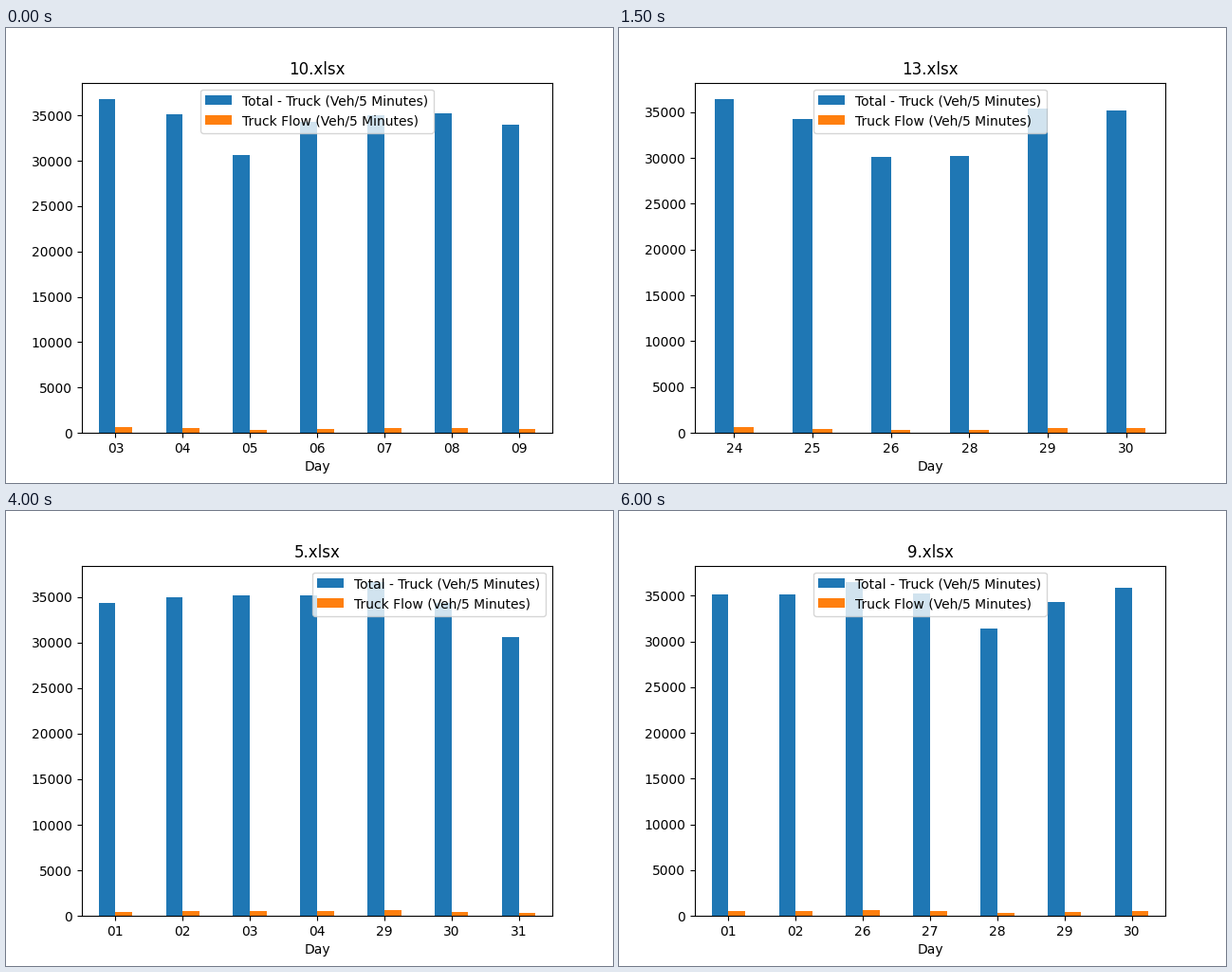
A matplotlib script for the animation above (6500 ms loop, 640 by 480 pixels).

```python
import numpy as np
import matplotlib.pyplot as plt
from matplotlib.animation import FuncAnimation

# Cars on a usual Saturday to Thursday, and on the Friday that opens each week
USUAL = [34300, 30600, 34300, 35000, 35200, 35200]
FRIDAYS = [36130, 36400, 35280, 36300, 36600, 36980, 36500,
           36700, 36480, 36775, 36600, 36400, 36400]

# Cars on unusual days, by week and weekday (Friday is 0)
UNUSUAL = {
    1: {1: 32650, 2: 29480, 5: 34200},
    6: {5: 35650, 6: 35650},
    9: {1: 35250, 2: 31400, 4: 35850},
    10: {1: 35130, 6: 34000},
    12: {1: 33000, 2: 36200, 3: 35650, 5: 34050, 6: 36970},
    13: {2: 30100, 4: 30200, 5: 35400},
}
MISSING = {(13, 3)}
MONTHS = (31, 30, 31)
LEGENDS = {5: "upper right", 12: "upper left"}

# File names in the order they are shown
ORDER = [10, 11, 12, 13] + list(range(1, 10))


def month_day(n):
    for length in MONTHS:
        if n < length:
            return n + 1
        n -= length


def week_data(week):
    """Day labels with their car counts, sorted by label."""
    cars = dict(enumerate([FRIDAYS[week - 1]] + USUAL))
    cars.update(UNUSUAL.get(week, {}))
    rows = sorted((month_day(7 * (week - 1) + k), count)
                  for k, count in cars.items() if (week, k) not in MISSING)
    days, counts = zip(*rows)
    return days, np.array(counts)


def truck_flow(cars):
    return 330 + 7.5 * ((cars - 30000) / 1000) ** 2


fig, ax = plt.subplots(figsize=(6.4, 4.8), dpi=100)


def draw(i):
    week = ORDER[i]
    days, cars = week_data(week)
    x = np.arange(len(days))
    ax.clear()
    ax.bar(x - 0.125, cars, 0.25, color="C0", label="Total - Truck (Veh/5 Minutes)")
    ax.bar(x + 0.125, truck_flow(cars), 0.25, color="C1", label="Truck Flow (Veh/5 Minutes)")
    ax.set_xlim(-0.5, len(days) - 0.5)
    ax.set_ylim(0, max(cars) * 1.05)
    ax.set_xticks(x, [f"{d:02d}" for d in days])
    ax.set_yticks(range(0, 35001, 5000))
    ax.set_xlabel("Day")
    ax.set_title(f"{week}.xlsx")
    ax.legend(loc=LEGENDS.get(week, "upper center"))
    return []


anim = FuncAnimation(fig, draw, frames=len(ORDER), init_func=lambda: [],
                     interval=500, repeat=True, repeat_delay=0)
plt.show()
```
